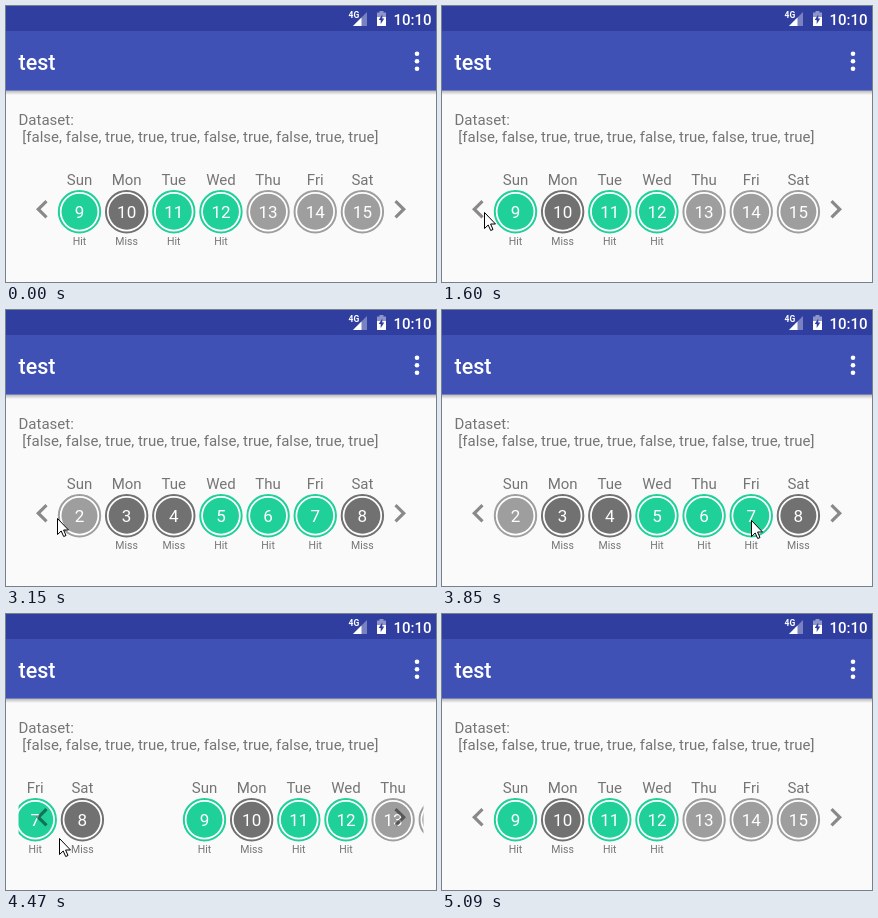
An HTML page for the animation above (6330 ms loop, 430 by 276 pixels).

```html
<!DOCTYPE html>
<html lang="en">
<head>
<meta charset="utf-8">
<title>Week pager</title>
<style>
  html, body { margin: 0; width: 100%; height: 100%; overflow: hidden; background: #fafafa; }
  svg { display: block; width: 430px; height: 276px; font-family: Roboto, sans-serif; font-size: 15px; fill: #757575; }
  .bar { fill: #fff; font-weight: 500; }
  .day { text-anchor: middle; }
  .number { font-size: 17px; fill: #fff; }
  .result { font-size: 10.5px; }
</style>
</head>
<body>
<svg viewBox="0 0 430 276">
  <defs>
    <clipPath id="window"><rect x="12.5" y="160" width="405" height="90"/></clipPath>
    <linearGradient id="shadow" x2="0" y2="1">
      <stop stop-color="#000" stop-opacity=".3"/>
      <stop offset="1" stop-color="#000" stop-opacity="0"/>
    </linearGradient>
    <path id="chevron" d="M41.6 196.2L39.4 194 30 203.2 39.4 212.4 41.6 210.2 34.6 203.2Z" fill="#000" fill-opacity=".45"/>
  </defs>
  <rect width="430" height="276" fill="#fafafa"/>
  <rect y="84" width="430" height="5" fill="url(#shadow)"/>
  <rect width="430" height="84.5" fill="#3f51b5"/>
  <rect width="430" height="25" fill="#303f9f"/>
  <g class="bar">
    <text x="342.5" y="12" font-size="8.5" font-weight="700">4G</text>
    <path d="M361 6V20H347Z" opacity=".35"/>
    <path d="M355.5 11.5V20H347Z"/>
    <path d="M373.5 5h4v1.5h2.5v13.5h-9V6.500h2.500Z" opacity=".45"/>
    <path d="M371 11h9v9h-9Z"/>
    <path d="M376.300 8.500V12.500h2L374.700 18v-4h-2Z" fill="#303f9f"/>
    <text x="387.500" y="18.500">10:10</text>
    <text x="12.500" y="64" font-size="21.500">test</text>
    <circle cx="411" cy="47.800" r="2.300"/>
    <circle cx="411" cy="55.300" r="2.300"/>
    <circle cx="411" cy="62.800" r="2.300"/>
  </g>
  <text x="12.500" y="118.500">Dataset:</text>
  <text id="dataset" x="16.300" y="136.300"></text>
  <g clip-path="url(#window)"><g id="days" class="day"></g></g>
  <use href="#chevron"/>
  <use href="#chevron" transform="matrix(-1 0 0 1 430 0)"/>
  <path id="cursor" d="M.5.5V16.500L4.200 13 6.700 18.500 9 17.500 6.600 12H11.500Z" fill="#fff" stroke="#000" stroke-width="1"/>
</svg>
<script>
const LOOP = 6330, START = 202, STEP = 77.46, LAST_STEP = 63;
const PAGE = 405, FIRST_HIT_DAY = 3;
const dataset = [false, false, true, true, true, false, true, false, true, true];
const names = ['Sun', 'Mon', 'Tue', 'Wed', 'Thu', 'Fri', 'Sat'];
const find = id => document.getElementById(id);

// Keys are [step, ...values], joined by straight lines.
const scrollKeys = [
  [26, 405], [27, 96], [28, 13], [29, 0], [50, 0], [51, 45], [52, 103], [53, 158],
  [54, 205], [55, 280], [56, 345], [57, 380], [58, 394], [59, 401], [60, 404], [61, 405]
];
const cursorKeys = [
  [0, 308, 168], [2, 248, 200], [4, 180, 230], [6, 128, 242], [8, 111, 240],
  [9, 111, 240], [11, 102, 235], [15, 58, 213], [18, 42, 206],
  [22, 42, 206], [25, 36, 207],
  [37, 36, 207], [39, 65, 208], [42, 165, 210], [43, 181, 210],
  [44, 181, 210], [46, 280, 210], [47, 309, 210], [49, 300, 211], [50, 273, 213],
  [51, 228, 216], [52, 170, 219], [53, 115, 221],
  [54, 70, 223], [55, 53, 224], [58, 49, 225], [60, 73, 244], [62, 107, 272]
];

function sample(keys, step) {
  const next = keys.findIndex(key => key[0] > step);
  if (next === 0) return keys[0].slice(1);
  if (next < 0) return keys[keys.length - 1].slice(1);
  const a = keys[next - 1], b = keys[next];
  const part = (step - a[0]) / (b[0] - a[0]);
  return a.slice(1).map((value, i) => value + (b[i + 1] - value) * part);
}

function dayMarkup(index) {
  const date = index + 2, hit = dataset[date - FIRST_HIT_DAY];
  const x = 73.5 + index % 7 * 47.15 + Math.floor(index / 7) * PAGE;
  const color = hit === undefined ? '#9e9e9e' : hit ? '#20d099' : '#717171';
  const result = hit === undefined ? '' : hit ? 'Hit' : 'Miss';
  return `<g transform="translate(${x} 0)">
    <text y="178.5">${names[index % 7]}</text>
    <circle cy="205.700" r="20.700" fill="#fff" stroke="${color}" stroke-width="2"/>
    <circle cy="205.700" r="18" fill="${color}"/>
    <text class="number" y="211.700">${date}</text>
    <text class="result" y="239.300">${result}</text>
  </g>`;
}

find('dataset').textContent = `[${dataset.join(', ')}]`;
find('days').innerHTML = Array.from({ length: 14 }, (_, i) => dayMarkup(i)).join('');

function draw(now) {
  const step = Math.floor((now % LOOP - START) / STEP);
  const [scroll] = sample(scrollKeys, step);
  const [x, y] = sample(cursorKeys, step).map(Math.round);
  find('days').setAttribute('transform', `translate(${-scroll} 0)`);
  find('cursor').setAttribute('transform', `translate(${x} ${y})`);
  find('cursor').style.display = step >= 0 && step < LAST_STEP ? '' : 'none';
}

const begin = performance.now();
function tick() {
  draw(performance.now() - begin);
  requestAnimationFrame(tick);
}
tick();
</script>
</body>
</html>
```
